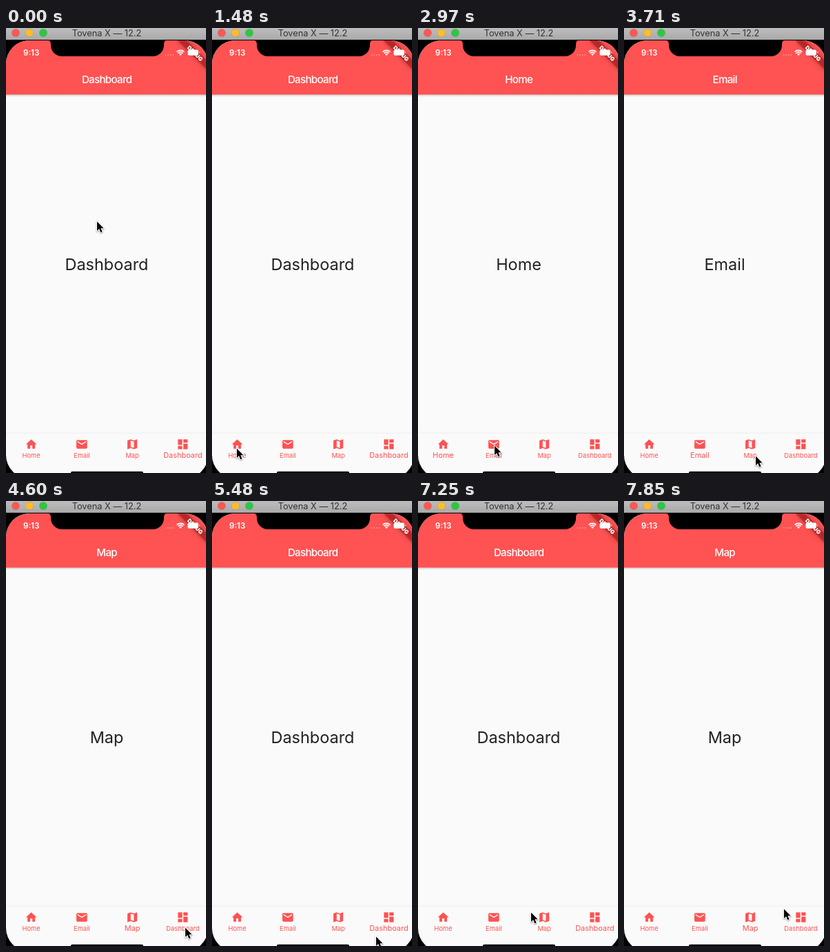
These frames come from a looping animation (290 by 645 pixels, 8 s). An HTML page with a canvas:

```html
<!DOCTYPE html>
<html lang="en">
<head>
<meta charset="utf-8">
<title>Bottom navigation</title>
<style>
html, body { margin: 0; width: 100%; height: 100%; overflow: hidden; background: #000; }
canvas { display: block; width: 290px; height: 645px; }
</style>
</head>
<body>
<canvas id="stage"></canvas>
<script>
const W = 290, H = 645, LOOP = 8000;
const canvas = document.getElementById('stage');
const ctx = canvas.getContext('2d');
const dpr = window.devicePixelRatio || 1;
canvas.width = W * dpr;
canvas.height = H * dpr;

const RED = '#ff5252', PAPER = '#fafafa', INK = '#212121';
const FONT = 'Inter, "Open Sans", sans-serif';
const UNIT = 0.782; // stage pixels per app point
const SCREEN = { x: 0, y: 18, w: 293, h: 635, r: 34 };
const MID = SCREEN.w / 2;

const tabs = [
  { name: 'Home', icon: 'M10 20v-6h4v6h5v-8h3L12 3 2 12h3v8z' },
  { name: 'Email', icon: 'M20 4H4c-1.1 0-2 .9-2 2v12c0 1.1.9 2 2 2h16c1.1 0 2-.9 2-2V6c0-1.1-.9-2-2-2zm0 4l-8 5-8-5V6l8 5 8-5v2z' },
  { name: 'Map', icon: 'M20.5 3L15 5.1 9 3 3.36 4.9c-.2.07-.36.25-.36.48V20.5c0 .28.22.5.5.5L9 18.9l6 2.1 5.64-1.9c.2-.07.36-.25.36-.48V3.5c0-.28-.22-.5-.5-.5zM15 19l-6-2.11V5l6 2.11V19z' },
  { name: 'Dashboard', icon: 'M3 13h8V3H3v10zm0 8h8v-6H3v6zm10 0h8V11h-8v10zm0-18v6h8V3h-8z' }
].map(t => ({ name: t.name, icon: new Path2D(t.icon) }));

// [time, tab]
const taps = [[0, 3], [1780, 0], [3260, 1], [4160, 2], [4890, 3], [7700, 2]];
const TAP_STEP = 145;

// [time, x, y] of the pointer tip, held until the next entry
const pointer = [
  [0, 132, 280], [150, 128, 473],
  [1050, 108, 500], [1190, 72, 548], [1340, 45, 590], [1480, 36, 609],
  [2220, 52, 490], [2370, 161, 200], [2520, 133, 567],
  [2820, 119, 594], [2970, 111, 605],
  [3560, 160, 615], [3710, 191, 620],
  [4450, 238, 619], [4600, 260, 618],
  [5480, 238, 631], [5630, 206, 638], [5770, 228, 636], [5920, 244, 633],
  [6520, 257, 630], [6660, 150, 205], [6800, 95, 340], [6950, 120, 525],
  [7250, 164, 596], [7400, 187, 622], [7850, 232, 591]
];

function indexAt(list, t) {
  let i = 0;
  while (i + 1 < list.length && list[i + 1][0] <= t) i++;
  return i;
}

function text(str, x, y, size, color, weight = 400, spacing = 0) {
  ctx.font = `${weight} ${size}px ${FONT}`;
  ctx.letterSpacing = spacing + 'px';
  ctx.fillStyle = color;
  ctx.textAlign = 'center';
  ctx.fillText(str, x + spacing / 2, y);
  ctx.letterSpacing = '0px';
}

function dot(x, y, r, color) {
  ctx.fillStyle = color;
  ctx.beginPath();
  ctx.arc(x, y, r, 0, Math.PI * 2);
  ctx.fill();
}

function box(x, y, w, h, r, color) {
  ctx.fillStyle = color;
  ctx.beginPath();
  ctx.roundRect(x, y, w, h, r);
  ctx.fill();
}

function shade(y0, y1, from, to) {
  const g = ctx.createLinearGradient(0, y0, 0, y1);
  g.addColorStop(0, from);
  g.addColorStop(1, to);
  ctx.fillStyle = g;
  ctx.fillRect(0, y0, SCREEN.w, y1 - y0);
}

function drawWindowBar() {
  shade(0, 17, '#bdbdbd', '#a9a9a9');
  ['#fc5753', '#fdbc2f', '#2bc840'].forEach((c, i) => {
    dot(14 + i * 20, 7, 6, 'rgba(0,0,0,.16)');
    dot(14 + i * 20, 7, 5.6, c);
  });
  text('Tovena X — 12.2', 146, 12, 12.8, '#333');
}

function drawBanner() {
  ctx.save();
  ctx.translate(SCREEN.w, SCREEN.y);
  ctx.rotate(Math.PI / 4);
  ctx.shadowColor = 'rgba(0,0,0,.5)';
  ctx.shadowBlur = 6 * dpr;
  ctx.fillStyle = 'rgba(183,28,28,.63)';
  ctx.fillRect(-40 * UNIT, 28 * UNIT, 80 * UNIT, 12 * UNIT);
  ctx.shadowColor = 'transparent';
  text('DEBUG', 0, 34 * UNIT + 2.9, 8, '#fff', 900);
  ctx.restore();
}

function drawStatus() {
  text('9:13', 36.7, 40, 11.7, '#fff', 600);
  for (let i = 0; i < 4; i++) dot(231.5 + i * 3.6, 39, 0.9, 'rgba(255,255,255,.4)');

  const a = Math.PI * 0.25;
  ctx.strokeStyle = '#fff';
  ctx.lineWidth = 1.7;
  for (const r of [4.9, 7.6]) {
    ctx.beginPath();
    ctx.arc(253, 40, r, -Math.PI / 2 - a, -Math.PI / 2 + a);
    ctx.stroke();
  }
  ctx.fillStyle = '#fff';
  ctx.beginPath();
  ctx.moveTo(253, 40);
  ctx.arc(253, 40, 2.8, -Math.PI / 2 - a, -Math.PI / 2 + a);
  ctx.fill();

  box(263.5, 31.5, 15.5, 8.2, 2, '#fff');
  box(280, 34, 1.2, 3.2, 0.6, 'rgba(255,255,255,.6)');
}

function drawNotch() {
  const l = 65, r = 229, top = SCREEN.y - 1, base = 41;
  ctx.fillStyle = '#000';
  ctx.beginPath();
  ctx.moveTo(l - 6, top);
  ctx.arcTo(l, top, l, top + 6, 6);
  ctx.arcTo(l, base, l + 16, base, 16);
  ctx.arcTo(r, base, r, base - 16, 16);
  ctx.arcTo(r, top, r + 6, top, 6);
  ctx.lineTo(r + 6, top);
  ctx.fill();
}

function drawTabs(active, previous, progress) {
  shade(584, 587, 'rgba(0,0,0,0)', 'rgba(0,0,0,.015)');
  ctx.fillStyle = '#f1f1f1';
  ctx.fillRect(0, 587, SCREEN.w, 1);
  tabs.forEach((tab, i) => {
    const x = (i + 0.5) * SCREEN.w / tabs.length;
    const grow = i === active ? progress : i === previous ? 1 - progress : 0;
    ctx.save();
    ctx.translate(x - 12 * UNIT, 594);
    ctx.scale(UNIT, UNIT);
    ctx.fillStyle = RED;
    ctx.fill(tab.icon, 'evenodd');
    ctx.restore();
    text(tab.name, x, 623.2, (12 + 2 * grow) * UNIT, RED);
  });
}

function drawScreen(t) {
  const n = indexAt(taps, t);
  const active = taps[n][1];
  const previous = n ? taps[n - 1][1] : -1;
  const progress = n && t - taps[n][0] < TAP_STEP ? 0.5 : 1;
  const name = tabs[active].name;

  ctx.save();
  ctx.beginPath();
  ctx.roundRect(SCREEN.x, SCREEN.y, SCREEN.w, SCREEN.h, SCREEN.r);
  ctx.clip();
  ctx.fillStyle = PAPER;
  ctx.fillRect(0, SCREEN.y, SCREEN.w, SCREEN.h);
  shade(96, 100, 'rgba(0,0,0,.2)', 'rgba(0,0,0,0)');
  ctx.fillStyle = RED;
  ctx.fillRect(0, SCREEN.y, SCREEN.w, 78.5);
  text(name, MID, 80, 15.2, '#fff', 500, -0.75);
  text(name, MID - 0.5, 351, 30 * UNIT, INK);
  drawTabs(active, previous, progress);
  drawBanner();
  drawStatus();
  box(94, 642.8, 105, 4, 2, '#000');
  ctx.restore();
  drawNotch();
}

const arrow = new Path2D('M0 0V13.4L3.1 10.5 5.3 15.7 7.6 14.7 5.4 9.7H9.6Z');

function drawPointer(t) {
  const [, x, y] = pointer[indexAt(pointer, t)];
  ctx.save();
  ctx.translate(x, y + 0.5);
  ctx.lineJoin = 'round';
  ctx.lineWidth = 2;
  ctx.strokeStyle = '#fff';
  ctx.shadowColor = 'rgba(0,0,0,.4)';
  ctx.shadowBlur = 2 * dpr;
  ctx.shadowOffsetY = dpr;
  ctx.stroke(arrow);
  ctx.shadowColor = 'transparent';
  ctx.fillStyle = '#000';
  ctx.fill(arrow);
  ctx.restore();
}

function draw(now) {
  const t = now % LOOP;
  ctx.setTransform(dpr, 0, 0, dpr, 0, 0);
  ctx.fillStyle = '#000';
  ctx.fillRect(0, 0, W, H);
  drawWindowBar();
  drawScreen(t);
  drawPointer(t);
}

const start = performance.now();
function tick() {
  draw(performance.now() - start);
  requestAnimationFrame(tick);
}
tick();
</script>
</body>
</html>
```
